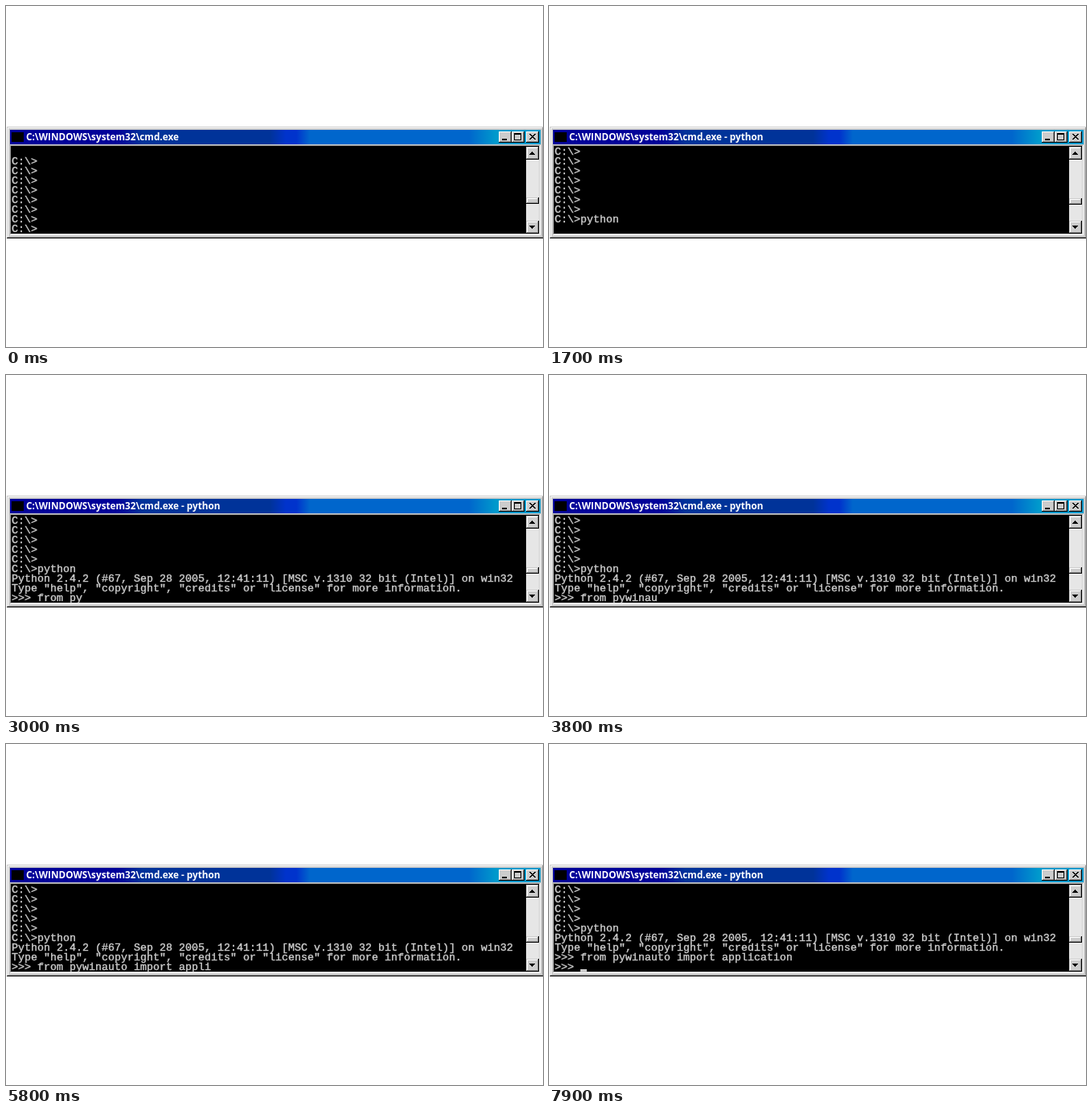
These frames come from a looping animation (668x424 px, 8 s). An HTML page:

```html
<!DOCTYPE html>
<html lang="en">
<head>
<meta charset="utf-8">
<title>Console session</title>
<style>
  html, body { margin: 0; width: 100%; height: 100%; overflow: hidden; background: #fff; }
  svg { display: block; width: 668px; height: 424px; shape-rendering: crispEdges; }
  text { white-space: pre; }
  .caption { font: bold 11.75px "Open Sans", "Noto Sans", sans-serif; fill: #fff; }
  .console { font: 13.333px "Liberation Mono", monospace; fill: #ccc; stroke: #ccc; stroke-width: .4px; }
</style>
</head>
<body>
<svg id="stage" viewBox="0 0 668 424">
  <defs>
    <linearGradient id="bar" gradientUnits="userSpaceOnUse" x1="5" y1="0" x2="665" y2="0">
      <stop offset=".2" stop-color="#000099"/>
      <stop offset=".25" stop-color="#003399"/>
      <stop offset=".49" stop-color="#003399"/>
      <stop offset=".52" stop-color="#0033cc"/>
      <stop offset=".54" stop-color="#0033cc"/>
      <stop offset=".565" stop-color="#0066cc"/>
      <stop offset=".865" stop-color="#0066cc"/>
      <stop offset=".915" stop-color="#0099cc"/>
    </linearGradient>
    <clipPath id="screen"><rect x="7" y="175" width="640" height="108"/></clipPath>
  </defs>
</svg>
<script>
const LOOP = 8000, CELL_W = 8, CELL_H = 12, LEFT = 7, TOP = 175, ROW_COUNT = 9;
const FACE = '#ccc', SHADOW = '#999', LIGHT = '#fff', DARK = '#000';
const stage = document.getElementById('stage');

function add(tag, attrs, parent = stage) {
  const node = document.createElementNS('http://www.w3.org/2000/svg', tag);
  for (const key in attrs) node.setAttribute(key, attrs[key]);
  parent.appendChild(node);
  return node;
}

const rect = (x, y, width, height, fill, parent) =>
  add('rect', { x, y, width, height, fill }, parent);

// Raised panel: two bevel lines around a grey face.
function raised(x, y, w, h, outer, inner, parent) {
  rect(x, y, w, h, DARK, parent);
  rect(x, y, w - 1, h - 1, outer, parent);
  rect(x + 1, y + 1, w - 2, h - 2, SHADOW, parent);
  rect(x + 1, y + 1, w - 3, h - 3, inner, parent);
  rect(x + 2, y + 2, w - 4, h - 4, FACE, parent);
}

const captionButton = x => raised(x, 156, 16, 14, LIGHT, FACE);
const scrollButton = (y, h, parent) => raised(647, y, 16, h, FACE, LIGHT, parent);

// Window frame and title bar
raised(1, 150, 668, 139, FACE, LIGHT);
rect(5, 154, 660, 18, 'url(#bar)');
rect(7, 157, 15, 12, DARK);
const caption = add('text', { x: 25, y: 167, class: 'caption' });

[613, 629, 647].forEach(captionButton);
rect(617, 165, 6, 2, DARK);
rect(632, 158, 9, 9, DARK);
rect(633, 160, 7, 6, FACE);
for (let i = 0; i < 7; i++) {
  rect(651 + i, 159 + i, 2, 1, DARK);
  rect(657 - i, 159 + i, 2, 1, DARK);
}

// Sunken client area
rect(5, 173, 660, 112, LIGHT);
rect(5, 173, 659, 111, SHADOW);
rect(6, 174, 658, 110, FACE);
rect(6, 174, 657, 109, DARK);

// Scroll bar
rect(647, 175, 16, 108, '#e6e6e6');
scrollButton(175, 16);
scrollButton(267, 16);
for (let i = 0; i < 4; i++) {
  rect(654 - i, 181 + i, 1 + 2 * i, 1, DARK);
  rect(654 - i, 276 - i, 1 + 2 * i, 1, DARK);
}
const thumb = add('g', {});
scrollButton(238, 8, thumb);

// Console text
const screen = add('g', { 'clip-path': 'url(#screen)' });
const rows = Array.from({ length: ROW_COUNT }, (_, i) =>
  add('text', { x: LEFT, y: TOP + 10 + i * CELL_H, class: 'console' }, screen));
const cursor = rect(LEFT, 280, CELL_W, 3, FACE, screen);

const PROMPT = 'C:\\>', REPL = '>>> ', PACE = 100, REPLY_DELAY = 100, PROMPT_DELAY = 200;
const BANNER = [
  'Python 2.4.2 (#67, Sep 28 2005, 12:41:11) [MSC v.1310 32 bit (Intel)] on win32',
  'Type "help", "copyright", "credits" or "license" for more information.'
];
const ENTER_COMMAND = 1700, ENTER_STATEMENT = 7200;

// Typing bursts: start, keys, optional pace. "_" flashes the cursor.
const BURSTS = [
  [300, '_'], [700, 'p'], [1000, 'ython_'], [ENTER_COMMAND, '\n'],
  [2100, 'from '], [2800, 'p_'], [3000, 'y'], [3200, '_'], [3400, 'winauto i'],
  [4500, 'm'], [4600, 'port '], [5300, 'app'], [5700, 'lication', 70],
  [6600, '_'], [7000, ''], [ENTER_STATEMENT, '\n'], [7900, '_']
];

function keysAt(t) {
  return BURSTS.filter(([start]) => start <= t).map(([start, keys, pace = PACE]) =>
    keys.slice(0, Math.floor((t - start) / pace) + 1));
}

function transcript(t, [command, statement, next]) {
  const lines = ['', ...Array(7).fill(PROMPT), PROMPT + command];
  if (t < ENTER_COMMAND) return lines;
  if (t < ENTER_COMMAND + REPLY_DELAY) return [...lines, ''];
  lines.push(...BANNER, REPL + statement);
  if (t < ENTER_STATEMENT) return lines;
  return [...lines, t < ENTER_STATEMENT + PROMPT_DELAY ? '' : REPL + next];
}

function setText(node, value) {
  if (node.textContent !== value) node.textContent = value;
}

function draw(t) {
  const keys = keysAt(t);
  const typed = keys.join('').replaceAll('_', '').split('\n');
  const visible = transcript(t, typed).slice(-ROW_COUNT);
  const running = t >= ENTER_COMMAND;
  const blink = keys.length > 0 && keys[keys.length - 1].endsWith('_');
  rows.forEach((row, i) => setText(row, visible[i]));
  setText(caption, 'C:\\WINDOWS\\system32\\cmd.exe' + (running ? ' - python' : ''));
  thumb.setAttribute('transform', `translate(0 ${running ? 1 : 0})`);
  cursor.setAttribute('x', LEFT + CELL_W * visible[ROW_COUNT - 1].length);
  cursor.setAttribute('visibility', blink ? 'visible' : 'hidden');
}

const start = performance.now();
function tick() {
  draw((performance.now() - start) % LOOP);
  requestAnimationFrame(tick);
}
tick();
</script>
</body>
</html>
```
